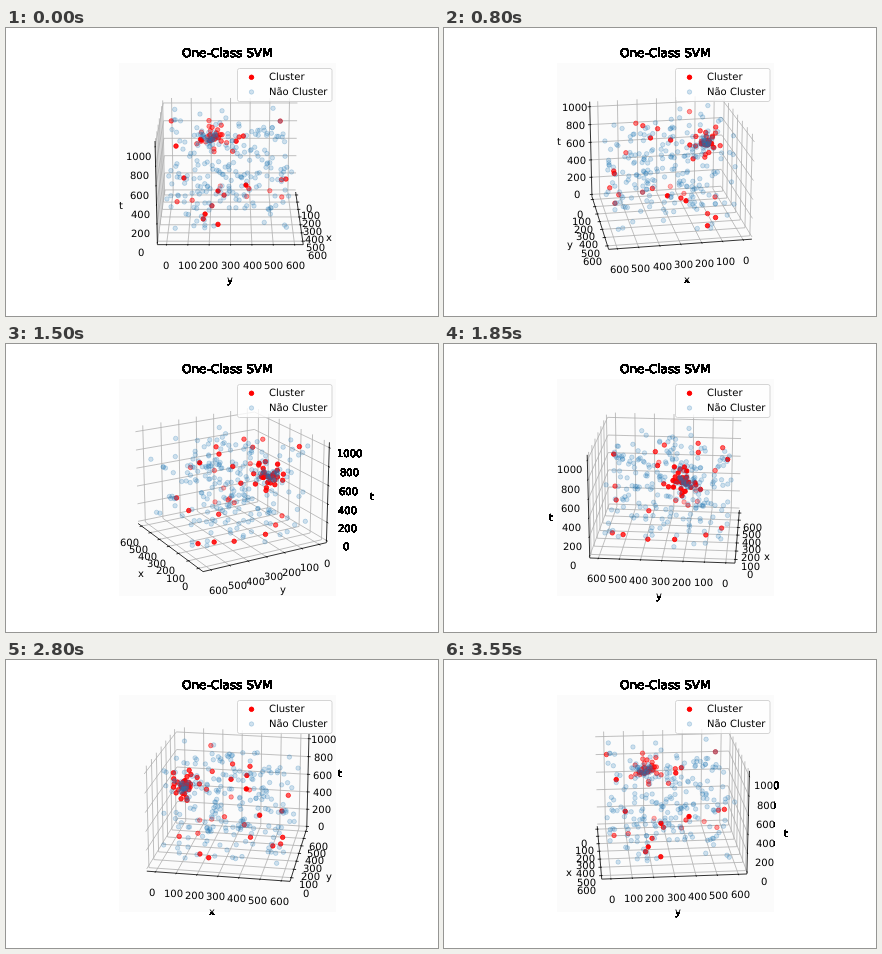
Recreate the animation shown at these times as an HTML page. Size 432 by 288 pixels, loop 3600 ms.

```html
<!DOCTYPE html>
<html lang="pt">
<head>
<meta charset="utf-8">
<title>One-Class SVM</title>
<style>
html, body { margin: 0; width: 100%; height: 100%; overflow: hidden; background: #fff; }
svg { display: block; width: 432px; height: 288px; }
text { font: 10px "DejaVu Sans", sans-serif; text-rendering: geometricPrecision; white-space: pre; }
.title { font-size: 12px; }
#grid { fill: none; stroke: #b0b0b0; stroke-width: .8; }
#axes { fill: none; stroke: #000; stroke-width: .8; }
.red { fill: #f00; stroke: #f00; }
.blue { fill: #1f77b4; stroke: #1f77b4; fill-opacity: .21; stroke-opacity: .21; }
</style>
</head>
<body>
<svg viewBox="0 0 432 288">
  <defs>
    <!-- text off the panel has hard black edges -->
    <filter id="hard" filterUnits="userSpaceOnUse" x="0" y="0" width="432" height="288" color-interpolation-filters="sRGB">
      <feComponentTransfer><feFuncA type="linear" slope="40"/></feComponentTransfer>
    </filter>
    <clipPath id="outside"><path clip-rule="evenodd" d="M0 0H432V288H0ZM113 35V252H330V35Z"/></clipPath>
  </defs>
  <rect width="432" height="288" fill="#fff"/>
  <rect x="113" y="35" width="217" height="217" fill="#fbfbfb"/>
  <path id="grid"/>
  <path id="axes"/>
  <g id="words"><text class="title" x="176" y="29">One-Class SVM</text></g>
  <g clip-path="url(#outside)"><use href="#words" filter="url(#hard)"/></g>
  <g id="reds"></g>
  <g id="blues"></g>
  <rect x="231.5" y="40.5" width="94.5" height="33" rx="2" fill="#fff" fill-opacity=".8" stroke="#ccc" stroke-opacity=".8"/>
  <circle class="red" cx="245.5" cy="49.3" r="2.24"/>
  <circle class="blue" cx="245.5" cy="64" r="2.24"/>
  <text x="263" y="52">Cluster</text>
  <text x="263" y="67">Não Cluster</text>
</svg>
<script>
const $ = id => document.getElementById(id);
const STEP = 50, STEPS = 72;
const ELEV = 20 * Math.PI / 180, SE = Math.sin(ELEV), CE = Math.cos(ELEV);
const CX = 224.34, CY = 140.34, DIST = 10, SCALE = 1175;

// box half sizes, data limits and tick spacing for x, y, t
const half = [.5715, .5715, .4285];
const edge = half.map(h => h * 25 / 24);
const delta = half.map(h => h / 6);
const low = [-29, -29, -3], range = [656, 656, 1037];
const ticks = [[100, 6], [100, 6], [200, 5]].map(([gap, n]) => Array.from({length: n + 1}, (_, i) => i * gap));
const names = ['x', 'y', 't'];
const TICK_PAD = 1.269, NAME_PAD = 2.759;

const toBox = (v, i) => ((v - low[i]) / range[i] - .5) * 2 * half[i];

function random(seed) {
  return () => {
    seed = seed + 0x6D2B79F5 | 0;
    let t = Math.imul(seed ^ seed >>> 15, 1 | seed);
    t = t + Math.imul(t ^ t >>> 7, 61 | t) ^ t;
    return ((t ^ t >>> 14) >>> 0) / 4294967296;
  };
}
const rnd = random(12);

// a point around the dense spot, at a radius between a and b
function near(a, b) {
  const r = a + (b - a) * rnd(), w = rnd() * 2 * Math.PI, c = rnd() * 2 - 1, s = Math.sqrt(1 - c * c);
  return [-.365 + r * s * Math.cos(w), -.17 + r * s * Math.sin(w), .168 + r * c];
}

const reds = [
  [-.28, -.51, .334], [.21, -.449, .272], [-.25, .43, .342], [0, .11, .29], [.16, .048, .298],
  [.31, -.383, .028], [.48, .127, .03], [-.08, .16, -.215], [.456, -.1, -.031], [.13, -.053, -.194],
  [.2, -.155, -.263], [.48, -.207, -.224], [.4, -.224, -.3], [.45, -.102, -.328], [.09, .47, -.064],
  [-.07, .44, -.13], [-.34, .35, -.335], [-.1, -.463, -.345], [-.2, -.335, -.371], [-.25, .453, -.36],
  [-.43, -.09, -.325], [-.315, .145, -.38], [.05, -.25, .277], [.18, -.24, .315], [-.17, .075, .225],
  [-.21, .02, .08]
];
for (let i = 0; i < 34; i++) reds.push(near(.02, .15));

const blues = [];
for (let i = 0; i < 22; i++) blues.push(near(.02, .1));
for (let i = 0; i < 215; i++) blues.push([.52, .52, .39].map(h => (rnd() * 2 - 1) * h));

function set(el, attrs) {
  for (const k in attrs) el.setAttribute(k, attrs[k]);
  return el;
}
function add(parent, tag, attrs) {
  return parent.appendChild(set(document.createElementNS('http://www.w3.org/2000/svg', tag), attrs));
}

const redDots = reds.map(() => add($('reds'), 'circle', {class: 'red', r: 2.24}));
const blueDots = blues.map(() => add($('blues'), 'circle', {class: 'blue', r: 2.24}));
const word = s => {
  const el = add($('words'), 'text', {});
  el.textContent = s;
  return el;
};
const tickWords = ticks.map(list => list.map(word));
const nameWords = names.map(word);

function draw(step) {
  const az = step * 2 * Math.PI / STEPS, ca = Math.cos(az), sa = Math.sin(az);

  const project = ([x, y, z]) => {
    const along = x * ca + y * sa;
    const toward = along * CE + z * SE;
    const k = SCALE / (DIST - toward);
    return {x: CX + (y * ca - x * sa) * k, y: CY - (z * CE - along * SE) * k, toward};
  };
  const line = (...pts) => 'M' + pts.map(p => {
    const q = project(p);
    return q.x.toFixed(2) + ' ' + q.y.toFixed(2);
  }).join('L');
  const put = (p, i, v) => p.map((old, j) => j === i ? v : old);
  const outward = (p, i, pad) => p.map((v, j) => j === i ? v : v + Math.sign(v) * pad * delta[j]);
  const place = (el, p, width, drop) => {
    const q = project(p);
    set(el, {x: Math.round(q.x - width / 2), y: Math.round(q.y + drop)});
  };

  // the far walls carry the grid, the near edges carry the axes
  const back = [ca > -1e-9 ? -edge[0] : edge[0], sa > -1e-9 ? -edge[1] : edge[1], -edge[2]];
  const front = back.map(v => -v);
  let grid = '', axes = '';

  for (let i = 0; i < 3; i++) {
    const side = i === 0 ? 1 : 0;
    const base = put(back, side, front[side]);
    axes += line(base, put(base, i, front[i]));
    const sign = Math.sign(base[side]);

    ticks[i].forEach((value, n) => {
      const at = toBox(value, i);
      const wall = put(back, i, at), a = (i + 1) % 3, b = (i + 2) % 3;
      grid += line(put(wall, a, front[a]), wall, put(wall, b, front[b]));
      const pos = put(base, i, at);
      axes += line(put(pos, side, pos[side] + sign * .2 * delta[side]),
                   put(pos, side, pos[side] - sign * .1 * delta[side]));
      place(tickWords[i][n], outward(pos, i, TICK_PAD), 6.36 * String(value).length, 8);
    });
    place(nameWords[i], outward(put(base, i, 0), i, NAME_PAD), i === 2 ? 3.9 : 5.9, 3);
  }
  $('grid').setAttribute('d', grid);
  $('axes').setAttribute('d', axes);

  const shown = reds.map(project).sort((p, q) => p.toward - q.toward);
  const far = shown[0].toward, depth = shown[shown.length - 1].toward - far;
  shown.forEach((p, i) => {
    const alpha = (.3 + .7 * (p.toward - far) / depth).toFixed(3);
    set(redDots[i], {cx: p.x.toFixed(2), cy: p.y.toFixed(2), 'fill-opacity': alpha, 'stroke-opacity': alpha});
  });
  blues.forEach((b, i) => {
    const p = project(b);
    set(blueDots[i], {cx: p.x.toFixed(2), cy: p.y.toFixed(2)});
  });
}

const start = performance.now();
let last = -1;
function tick() {
  const step = Math.floor((performance.now() - start) / STEP) % STEPS;
  if (step !== last) draw(last = step);
  requestAnimationFrame(tick);
}
tick();
</script>
</body>
</html>
```
